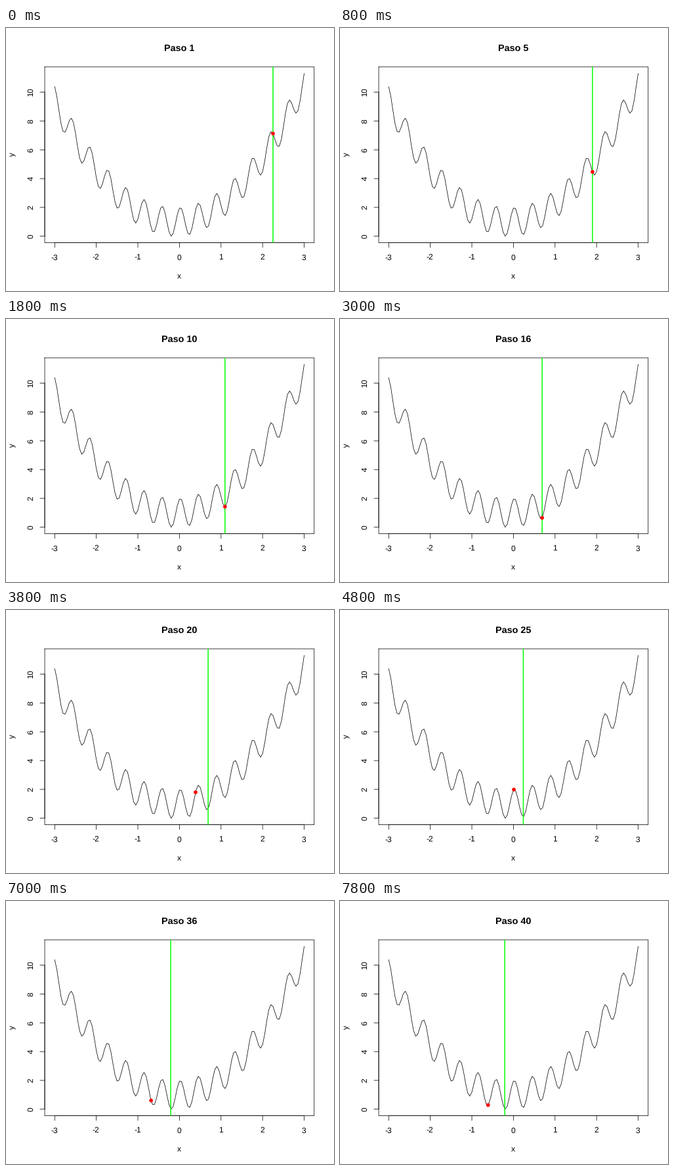
These frames come from a looping animation (500 px wide and 400 px high, 8 s). A matplotlib script:

```python
import numpy as np
import matplotlib.pyplot as plt
from matplotlib.animation import FuncAnimation
from matplotlib.patches import Circle

plt.rcParams["font.family"] = "Liberation Sans"
plt.rcParams["text.hinting"] = "none"

W, H, DPI = 500, 400, 100
PX = 72 / DPI
LEFT, RIGHT, TOP, BOTTOM = 59.04, 469.76, 59.04, 326.56
THIN, TICK = 0.75, 7.2
STEPS = 40


def cost(x):
    return np.cos(14.5 * x - 0.3) + x * (x + 0.2) + 1


# The search drifts between a few turning points and remembers its lowest one.
key_step = [1, 2, 5, 7, 10, 16, 25, 28, 31, 35, 40]
key_x = [2.25, 2.345, 1.9, 1.51, 1.095, 0.69, 0.01, -0.21, -0.48, -0.70, -0.61]
walk = np.interp(np.arange(1, STEPS + 1), key_step, key_x)


def best(i):
    seen = walk[:i + 1]
    return seen[np.argmin(cost(seen))]


xs = np.linspace(-3, 3, 121)
ys = cost(xs)


def scale(v, data, start, end):
    """Map v to pixels, with a 4 % margin around the data range."""
    span = np.ptp(data)
    return start + (v - data.min() + 0.04 * span) / (1.08 * span) * (end - start)


def sx(x):
    return scale(x, xs, LEFT, RIGHT)


def sy(y):
    return scale(y, ys, BOTTOM, TOP)


fig = plt.figure(figsize=(W / DPI, H / DPI), dpi=DPI, facecolor="white")
ax = fig.add_axes([0, 0, 1, 1])
ax.set_xlim(0, W)
ax.set_ylim(H, 0)
ax.axis("off")


def stroke(x, y, color="black", width=THIN, cap="round"):
    return ax.plot(x, y, color=color, lw=width * PX, snap=False,
                   solid_capstyle=cap, solid_joinstyle="round")[0]


def label(x, y, text, size=12, **kw):
    return ax.text(x - 0.5, y, text, fontsize=size * PX, color="black",
                   ha="center", va="baseline", rotation_mode="anchor", **kw)


stroke(sx(xs), sy(ys))
stroke([LEFT, RIGHT, RIGHT, LEFT, LEFT], [TOP, TOP, BOTTOM, BOTTOM, TOP])

stroke([sx(-3), sx(3)], [BOTTOM] * 2)
for v in range(-3, 4):
    stroke([sx(v)] * 2, [BOTTOM, BOTTOM + TICK])
    label(sx(v), 352.5, str(v))

stroke([LEFT] * 2, [sy(0), sy(10)])
for v in range(0, 11, 2):
    stroke([LEFT - TICK, LEFT], [sy(v)] * 2)
    label(41.8, sy(v), str(v), rotation=90)

label(sx(0), 381.3, "x")
label(13, (TOP + BOTTOM) / 2 - 0.5, "y", rotation=90)
title = label(sx(0), 34.8, "", size=14.4, weight="bold")

marker = stroke([0, 0], [TOP, BOTTOM], "#00ff00", 2 * THIN, "butt")
dot = ax.add_patch(Circle((0, 0), 2.85, color="red", lw=0, zorder=3))


def draw(i):
    title.set_text(f"Paso {i + 1}")
    marker.set_xdata([sx(best(i))] * 2)
    dot.center = sx(walk[i]), sy(cost(walk[i]))
    return title, marker, dot


anim = FuncAnimation(fig, draw, frames=STEPS, interval=200,
                     repeat=True, repeat_delay=0, blit=False)
plt.show()
```
